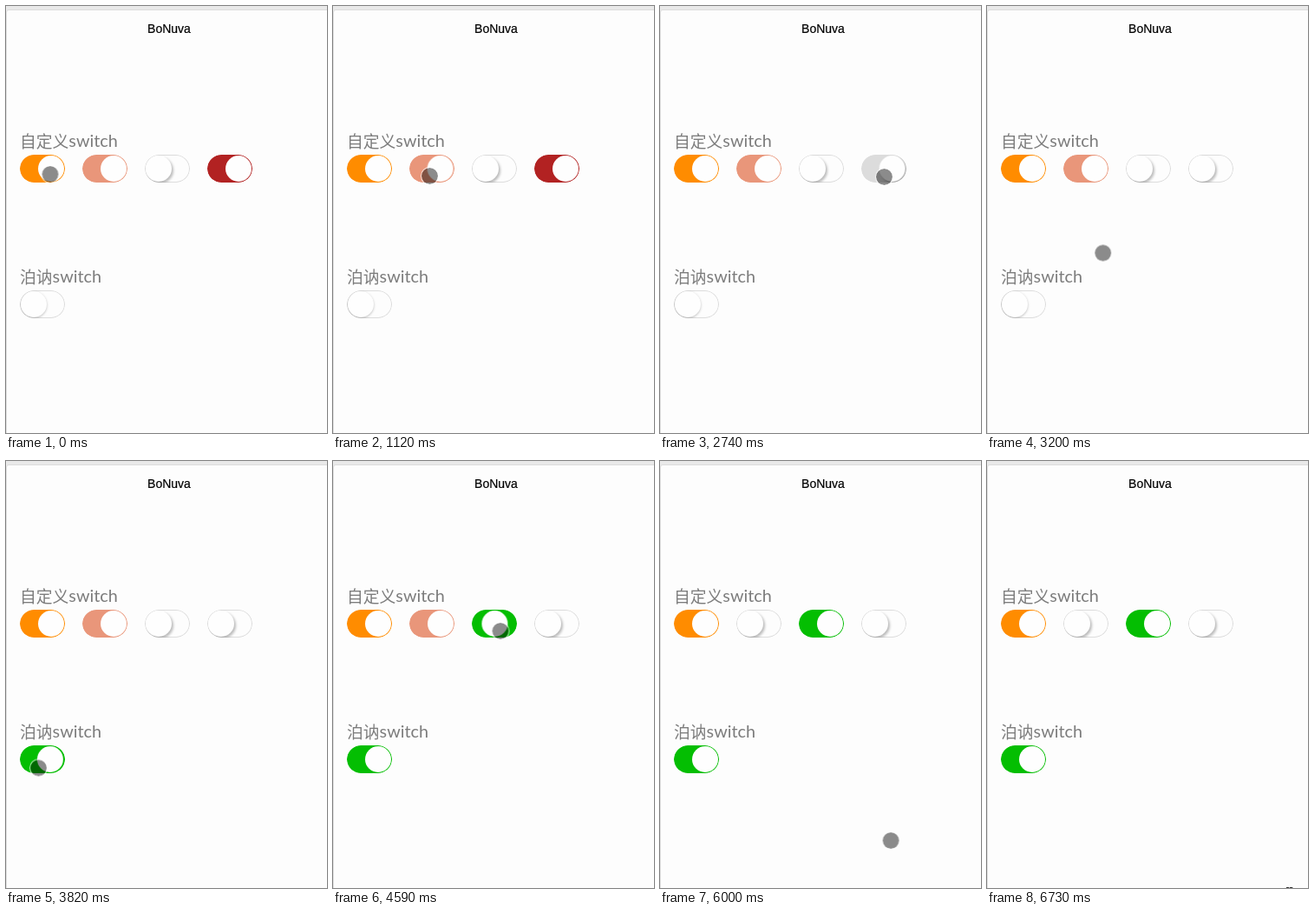
Animation, 370 px wide and 491 px high, one loop 6750 ms. Source, as an HTML page:

```html
<!DOCTYPE html>
<html lang="zh">
<head>
<meta charset="utf-8">
<title>Switches</title>
<style>
  html, body { margin: 0; width: 100%; height: 100%; overflow: hidden; }
  body { position: relative; background: #e9e9e9; }
  .card {
    position: absolute; left: 0; top: 4px; width: 380px; height: 500px; box-sizing: border-box;
    background: #fdfdfd; border: 1px solid #dcdcdc; border-radius: 3px 0 0 0;
  }
  svg { position: absolute; left: 0; top: 0; }
  .title { font: 14px 'Liberation Sans', sans-serif; text-anchor: middle; stroke: #000; stroke-width: .2px; }
  .label { font: 18.8px 'Noto Sans CJK SC', 'Noto Sans CJK', sans-serif; fill: #7c7c7c; }
  .label tspan { font: 19.8px Lato, sans-serif; }
  .switch {
    position: absolute; width: 52px; height: 32px; border-radius: 16px;
    clip-path: inset(0 round 16px);
  }
  .fill, .thumb { position: absolute; left: 1px; top: 1px; height: 30px; border-radius: 15px; background: #fdfdfd; }
  .fill { width: 50px; }
  .thumb { width: 30px; background: #fefefe; }
  .cursor {
    position: absolute; left: -10.5px; top: -10.5px; width: 19px; height: 19px; border-radius: 50%;
    background: rgba(0, 0, 0, .45); background-clip: padding-box; border: 1px solid rgba(255, 255, 255, .7);
  }
  .tip {
    position: absolute; left: 345px; top: 490px; width: 8px; height: 1px;
    background: linear-gradient(90deg, #333 3px, #bbb 3px 4px, #333 4px 7px, #bbb 7px);
  }
</style>
</head>
<body>
<div class="card"></div>
<svg width="370" height="491">
  <text class="title" x="188" y="31">BoNuva</text>
  <text class="label" x="16" y="162.5">自定义<tspan y="162">switch</tspan></text>
  <text class="label" x="16" y="318.5">泊讷<tspan y="318">switch</tspan></text>
</svg>
<script>
const LOOP = 6750, SLIDE = 300, GRAY = '#dcdcdc', GREEN = '#04be02';

const add = (cls, parent = document.body) => {
  const el = document.createElement('div');
  el.className = cls;
  return parent.appendChild(el);
};

// steps: [ms, style, easing to the next step]
const play = (el, steps) => {
  const last = steps[steps.length - 1];
  const frames = [...steps, [LOOP, last[1]]].map(([ms, style, easing = 'linear']) =>
    ({ ...style, offset: ms / LOOP, easing }));
  const anim = el.animate(frames, { duration: LOOP, iterations: Infinity });
  anim.startTime = document.timeline.currentTime;
};

// toggles: [ms of the click, delay before the thumb slides]
function makeSwitch({ x, y, color, on, shadow = '2px 2px 3px', toggles = [] }) {
  const track = add('switch');
  track.style.left = x + 'px';
  track.style.top = y + 'px';
  const fill = add('fill', track), thumb = add('thumb', track);

  const paint = v => ({ backgroundColor: v ? color : GRAY });
  const shade = v => ({ boxShadow: `${shadow} rgba(0, 0, 0, ${v ? 0 : .26})` });
  const scale = v => ({ transform: `scale(${v ? 0 : 1})` });
  const slide = v => ({ transform: `translateX(${v ? 20 : 0}px)` });

  const hard = style => {
    let v = on;
    return [[0, style(v), 'step-end'], ...toggles.map(([ms]) => [ms, style(v = !v), 'step-end'])];
  };
  const soft = style => {
    let v = on;
    return [[0, style(v)], ...toggles.flatMap(([ms, wait]) => [
      [ms + wait, style(v), 'ease'],
      [ms + wait + SLIDE, style(v = !v)]
    ])];
  };
  play(track, hard(paint));
  play(thumb, hard(shade));
  play(thumb, soft(slide));
  play(fill, soft(scale));
}

[
  { x: 16, y: 171, color: '#ff8c00', on: true },
  { x: 88, y: 171, color: '#e9967a', on: true, toggles: [[410, 35], [875, 0], [5400, 35]] },
  { x: 160, y: 171, color: GREEN, on: false, toggles: [[1600, 0], [2080, 30], [4500, 0]] },
  { x: 232, y: 171, color: '#b22222', on: true, toggles: [[2680, 50]] },
  { x: 16, y: 327, color: GREEN, on: false, shadow: '0 1px 3px', toggles: [[3610, 0]] }
].forEach(makeSwitch);

const IN = 'ease-in', OUT = 'ease-out', BOTH = 'ease-in-out';
const path = [
  [0, 50.5, 193], [20, 50.5, 193, OUT],
  [200, 111, 195], [1210, 111, 195, BOTH],
  [1400, 187, 195], [2350, 187, 195, BOTH],
  [2500, 258, 196], [3020, 258, 196, BOTH],
  [3350, 44, 346], [3380, 37, 352.5], [3900, 37, 352.5, BOTH],
  [4280, 187, 198], [4300, 192.5, 195], [4790, 192.5, 195, IN],
  [4900, 172, 240], [4980, 147, 261], [5080, 117, 230],
  [5170, 129, 196], [5190, 131, 195], [5550, 131, 195, BOTH],
  [5760, 256, 427], [5920, 256, 427, BOTH],
  [6260, 338, 503]
];
play(add('cursor'), path.map(([ms, x, y, easing]) =>
  [ms, { transform: `translate(${x}px, ${y}px)` }, easing]));

play(add('tip'), [[0, { opacity: 0 }, 'step-end'], [6730, { opacity: 1 }]]);
</script>
</body>
</html>
```
